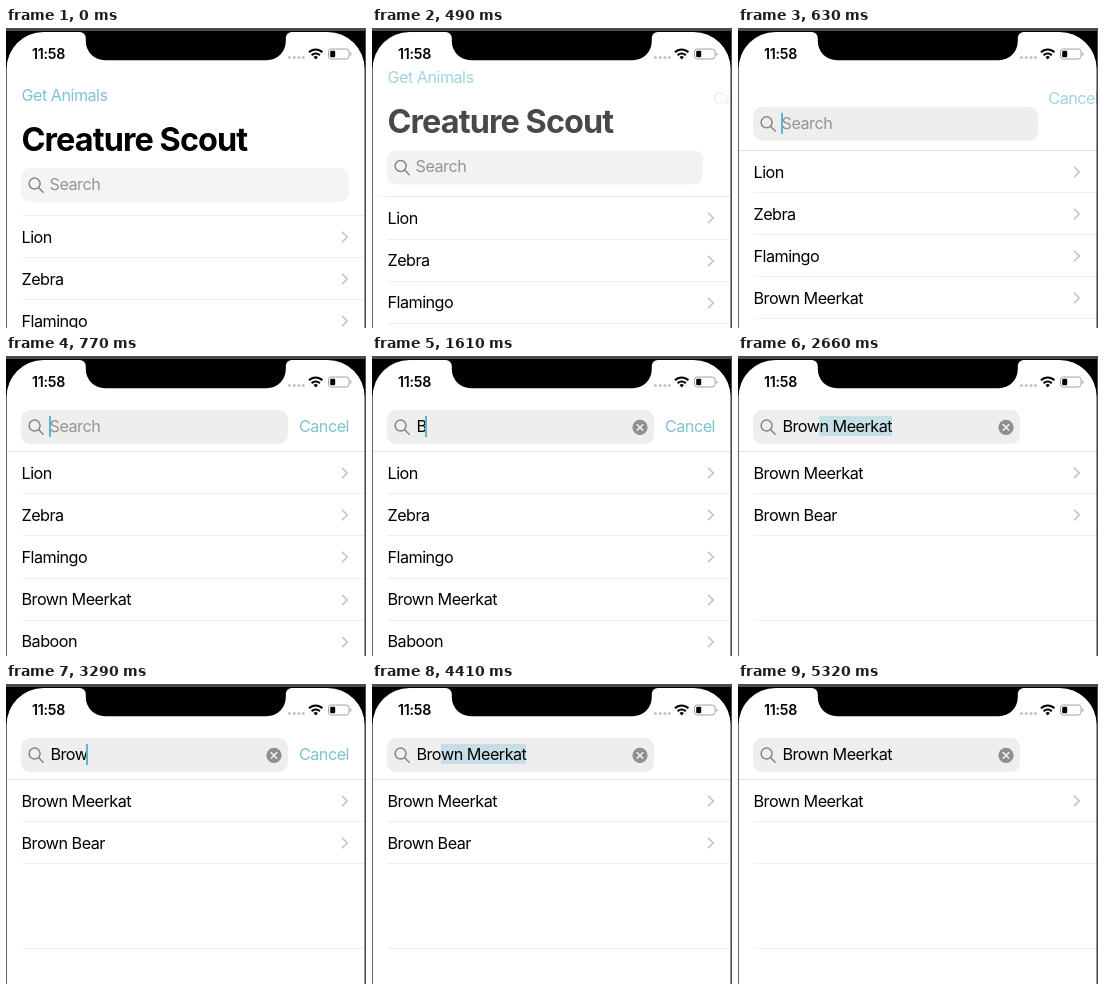
Animation, 360 px wide and 300 px high, one loop 5740 ms. Source, as an HTML page:

```html
<!DOCTYPE html>
<html lang="en">
<head>
<meta charset="utf-8">
<title>Search field with inline completion</title>
<style>
  html, body { margin: 0; width: 100%; height: 100%; overflow: hidden; }
  #stage {
    --p: 0;                                /* search bar activation, 0 to 1 */
    --lift: calc(var(--p) * -86px);
    --list: calc(95.3px + (1 - var(--p)) * 92px);
    position: relative; width: 360px; height: 300px; overflow: hidden;
    background: #fff; color: #000;
    font: 16.2px/20px Inter, "Liberation Sans", sans-serif;
    letter-spacing: -.52px; white-space: pre;
  }
  #stage > *, .row > *, #field > * { position: absolute; }
  .teal { color: #7dc3ce; }
  #nav { left: 0; top: 0; transform: translateY(var(--lift)); opacity: calc(1 - var(--p) * 1.42); }
  #nav > * { position: absolute; left: 15.5px; }
  #nav .teal { top: 56.5px; }
  h1 { margin: 0; top: 92px; font-size: 32.4px; line-height: 40px; letter-spacing: -.9px; }
  #field {
    left: 15.3px; top: 139.5px; height: 34px; border-radius: 9px;
    width: calc(328px - var(--p) * 60.8px);
    transform: translateY(var(--lift));
  }
  #field svg { left: 0; top: 0; }
  #field #clear { left: auto; right: -.5px; }
  #entry, #hint { left: 29.2px; top: 6.7px; }
  #hint { left: 28.3px; color: #949498; }
  #sel { background: #c6dfe6; }
  #caret { display: inline-block; position: relative; width: 0; height: 0; }
  #caret::after {
    content: ""; position: absolute; left: -1.4px; top: -16.5px;
    width: 2px; height: 21.5px; background: #5db5cb;
  }
  #cancel { left: calc(293px + (1 - var(--p)) * 60.3px); top: 59.5px; }
  #edge { left: 0; top: var(--list); width: 360px; height: 1px; background: #e2e2e4; }
  #rows { left: 0; top: var(--list); }
  .row { position: absolute; left: 15.5px; width: 345px; height: 42.1px; }
  .row span { top: 11.8px; }
  .row svg { left: 318px; top: 14px; }
  .line { position: absolute; left: 15.5px; width: 345px; height: 1px; background: #efeff0; }
  #phone { left: 0; top: 0; }
</style>
</head>
<body>
<div id="stage">
  <div id="nav"><span class="teal">Get Animals</span><h1>Creature Scout</h1></div>
  <div id="rows"></div>
  <div id="edge"></div>
  <div id="field">
    <svg width="30" height="34" fill="none" stroke="#85858a" stroke-width="1.5" stroke-linecap="round">
      <circle cx="13.6" cy="15.6" r="5.5"/><path d="M17.7 19.7l4.5 4.6"/>
    </svg>
    <span id="hint">Search</span>
    <span id="entry"><span id="typed"></span><span id="caret"></span><span id="sel"></span></span>
    <svg id="clear" width="30" height="34">
      <circle cx="15" cy="17.4" r="7.6" fill="#8e8e93"/>
      <path d="M12.2 14.6l5.6 5.6m0-5.6l-5.6 5.6" stroke="#f2f2f3" stroke-width="1.5" stroke-linecap="round"/>
    </svg>
  </div>
  <span id="cancel" class="teal">Cancel</span>
  <svg id="phone" width="360" height="300">
    <path fill="#000" fill-rule="evenodd" d="M0 0H360V300H0Z
      M.6 300V41A37 37 0 0 1 37.6 4H73.8A6 6 0 0 1 79.8 10V13.3A19 19 0 0 0 98.8 32.3H260.8
      A19 19 0 0 0 279.8 13.3V10A6 6 0 0 1 285.8 4H321.6A37 37 0 0 1 358.6 41V300Z"/>
    <path fill="#4b4b4b" d="M0 0H360V3H0ZM359 3h1V300h-1Z"/>
    <text x="26" y="31.2" font-size="14.2" font-weight="600" letter-spacing="-.25">11:58</text>
    <g fill="#c4c4c6">
      <circle cx="283.4" cy="29.6" r="1.5"/><circle cx="288.2" cy="29.6" r="1.5"/>
      <circle cx="293" cy="29.6" r="1.5"/><circle cx="297.4" cy="29.6" r="1.5"/>
    </g>
    <g fill="none" stroke="#000" stroke-width="2">
      <path d="M303 24.3a9.4 9.4 0 0 1 13.4 0"/><path d="M305.6 27.2a5.8 5.8 0 0 1 8.2 0"/>
    </g>
    <path d="M309.7 31.4l-2.2-2.4a3.2 3.2 0 0 1 4.4 0Z"/>
    <rect x="322.5" y="21" width="20.5" height="10" rx="2.8" fill="none" stroke="#a2a2a4"/>
    <path d="M344.3 24.2v3.8q1.3-.5 1.3-1.9t-1.3-1.9Z" fill="#a2a2a4"/>
    <rect x="324.2" y="22.7" width="5" height="6.6" rx="1.2"/>
  </svg>
</div>
<script>
const LOOP = 5740, TICK = 70, PITCH = 42.1;
const $ = id => document.getElementById(id);
const FULL = "Brown Meerkat";

// start time, letters typed, completion shown
const ENTRIES = [
  [0, 0, false], [1540, 1, false], [2030, 2, true], [2380, 3, true],
  [2660, 4, true], [3290, 4, false], [3570, 3, false], [3850, 2, false],
  [4410, 3, true], [4760, 4, true], [5320, 13, false]
];
// start time, animals listed, separator positions in rows
const LISTS = [
  [0, ["Lion", "Zebra", "Flamingo", FULL, "Baboon"], [0, 1, 2, 3, 4]],
  [2030, [FULL, "Brown Bear"], [1, 2, 4]],
  [5320, [FULL], [1, 2, 4]]
];
const CHEVRON = '<svg width="12" height="16" fill="none" stroke="#c3c3c6" stroke-width="1.6">' +
  '<path d="M2 2.7l5.2 5.3L2 13.3"/></svg>';

const at = (steps, t) => steps.filter(s => s[0] <= t).pop();
const clamp = v => Math.min(1, Math.max(0, v));
const smooth = u => u * u * (3 - 2 * u);

let shown;
function drawList(list) {
  if (list === shown) return;
  shown = list;
  const [, names, lines] = list;
  $("rows").innerHTML =
    lines.map(n => `<div class="line" style="top:${n * PITCH}px"></div>`).join("") +
    names.map((s, i) => `<div class="row" style="top:${i * PITCH}px"><span>${s}</span>${CHEVRON}</div>`).join("");
}

function draw(t) {
  const moveTime = t < 770 ? Math.min(t, 630) : t;   // the slide pauses briefly before it lands
  const p = smooth(clamp((moveTime - 375) / 395));
  const active = clamp(p * 1.4);
  $("stage").style.setProperty("--p", p);
  $("field").style.backgroundColor = `rgb(${[0, 0, 1].map(b => 244 + b - 6 * active)})`;
  $("edge").style.opacity = active;

  const [, count, completing] = at(ENTRIES, t);
  const done = count === FULL.length;
  $("typed").textContent = FULL.slice(0, count);
  $("sel").textContent = completing ? FULL.slice(count) : "";
  $("hint").style.opacity = count ? 0 : 1;
  $("clear").style.opacity = !count ? 0 : t < 1610 ? .5 : 1;
  $("cancel").style.opacity = completing || done ? 0 : p;

  const blink = t < 1540 ? 1 - clamp((t - 980) / 210) : 1;
  $("caret").style.opacity = completing || done || t < 560 ? 0 : blink;
  drawList(at(LISTS, t));
}

const start = performance.now();
function frame() {
  const t = (performance.now() - start) % LOOP;
  draw(Math.floor(t / TICK) * TICK);
  requestAnimationFrame(frame);
}
frame();
</script>
</body>
</html>
```
